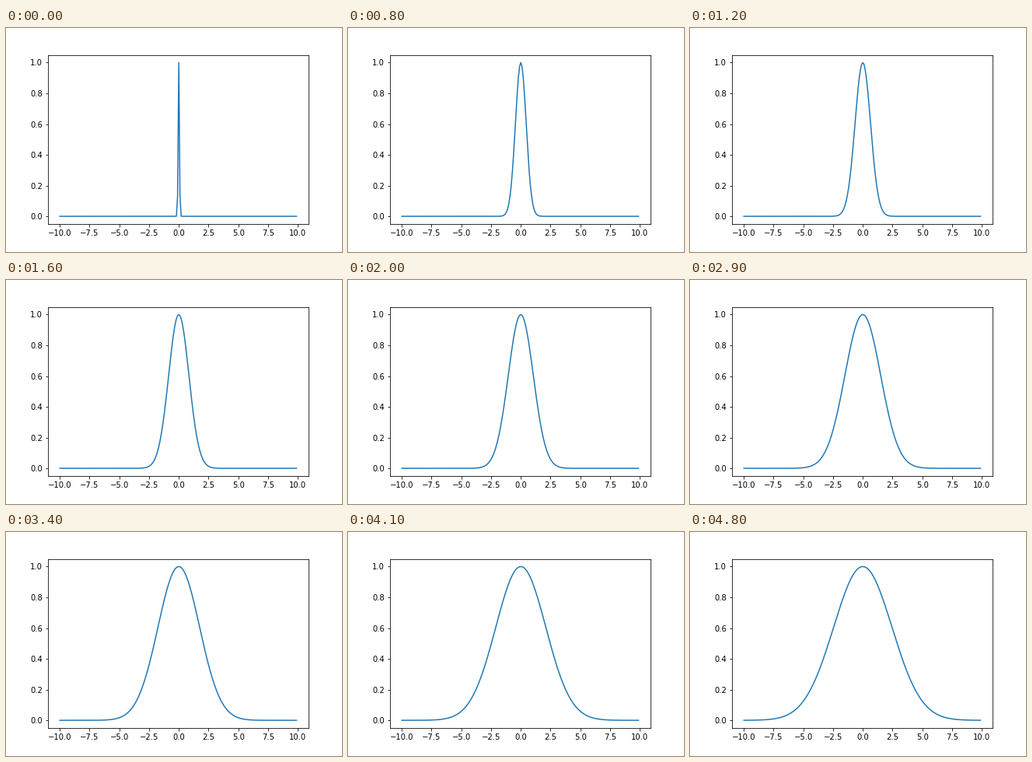
Write a matplotlib script that moves like this. It is 432 px wide and 288 px high and loops after 4.9 s.

```python
import numpy as np
import matplotlib.pyplot as plt
from matplotlib.animation import FuncAnimation

FRAMES = 49
INTERVAL = 100
SIGMA_STEP = 0.05

x = np.arange(-10, 10, 0.1)


def gaussian(sigma):
    return np.exp(-x**2 / (2 * sigma**2))


fig, ax = plt.subplots(figsize=(6, 4), dpi=72)
fig.subplots_adjust(left=0.125, right=0.9, bottom=0.125, top=0.88)
line, = ax.plot(x, gaussian(SIGMA_STEP), color="#1f77b4", lw=1.5)
ax.set_xlim(-10.995, 10.895)
ax.set_ylim(-0.05, 1.05)


def update(i):
    line.set_ydata(gaussian(SIGMA_STEP * (i + 1)))
    return line,


anim = FuncAnimation(fig, update, frames=FRAMES, interval=INTERVAL,
                     repeat=True, repeat_delay=0)
plt.show()
```
